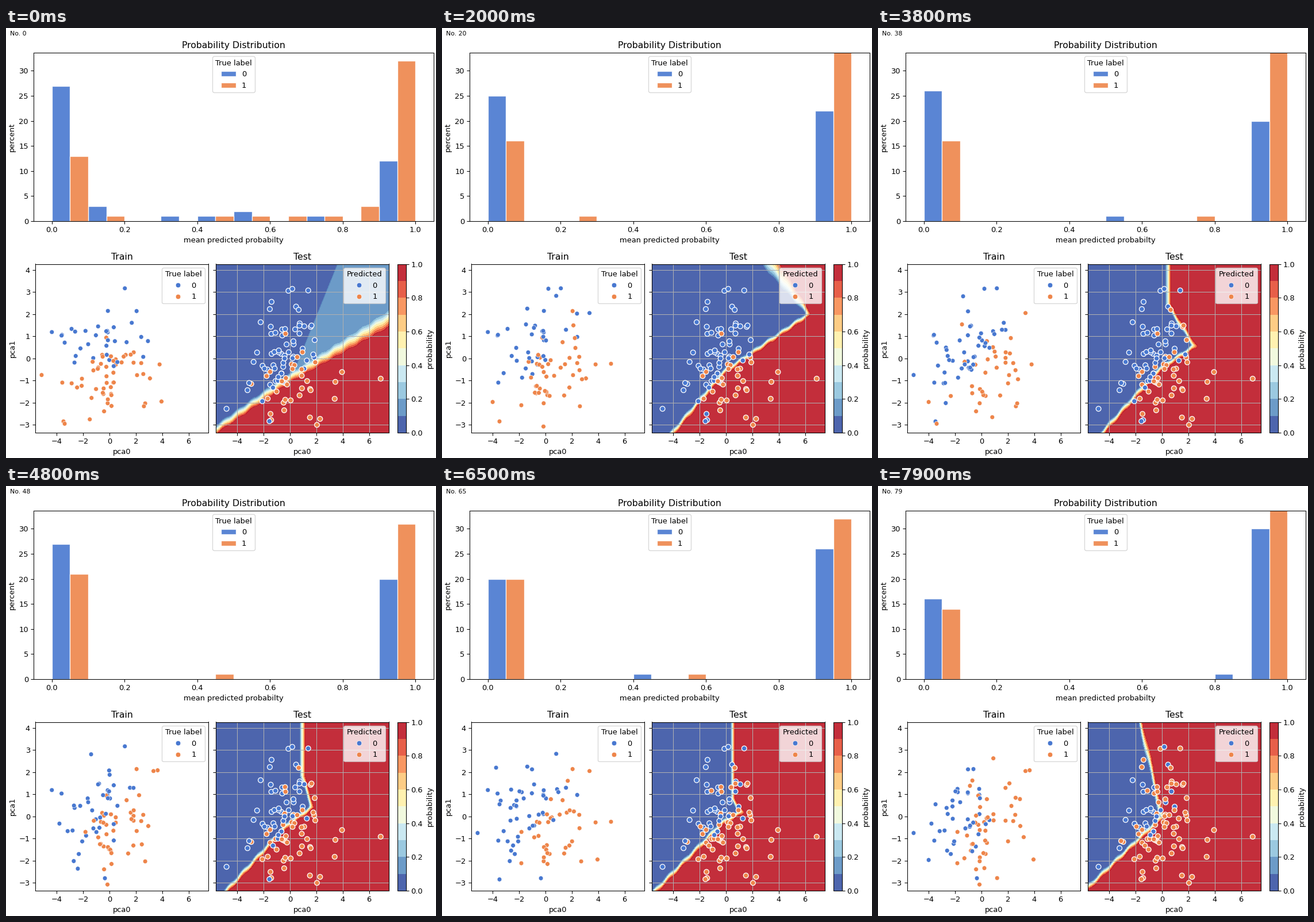
A matplotlib script that plays this animation: 748x748 px, repeating every 8000 ms.

```python
import matplotlib.pyplot as plt
import numpy as np
from matplotlib.animation import FuncAnimation
from matplotlib.lines import Line2D
from matplotlib.patches import Patch
from matplotlib.path import Path

SIZE, FRAMES, INTERVAL = 748, 80, 100
BLUE, ORANGE = "#4878d0", "#ee854a"
COLORS = np.array([BLUE, ORANGE])
XLIM, YLIM = (-5.61, 7.5), (-3.36, 4.26)
LEVELS = np.linspace(0, 1, 11)
ASPECT = np.array([.6, 1])  # makes data distances match screen distances


def cloud(rng, center, spread, count):
    """Normally distributed points without far outliers."""
    z = rng.normal(size=(count * 2, 2))
    return np.array(center) + z[(abs(z) < 2.6).all(1)][:count] * spread


rng = np.random.default_rng(7)
POOL = cloud(rng, (-.1, 0), (2, 1.4), 210)
POOL_NOISE = rng.normal(0, .5, len(POOL))
TEST = np.vstack([cloud(rng, (-.3, 0), (1.6, 1.25), 95),
                  [(6.88, -.92), (3.95, -.62), (-4.8, -2.28)]])
TEST_NOISE = rng.normal(.1, .65, len(TEST))
GRID_X, GRID_Y = np.meshgrid(np.linspace(*XLIM, 100), np.linspace(*YLIM, 80))
GRID = np.column_stack([GRID_X.ravel(), GRID_Y.ravel()])


def boundary(i):
    """Vertices (x, y, half width): a slope up to a knee, an apex, then the top."""
    slope = np.interp(i, [0, 9, 20, 79], [.42, .26, .71, .57])
    knee_y = np.interp(i, [0, 9, 20, 79], [-.95, -1.05, -.65, -.15])
    apex_x = np.interp(i, [9, 20, 38, 48, 65, 79], [8, 6.3, 2.5, 1.7, 1.2, 0])
    apex_y = np.interp(i, [0, 9, 20, 38, 79], [2, 1, 2, .55, 0])
    top_x = np.interp(i, [9, 20, 38, 48, 65, 79], [8, 3.3, .5, .95, .5, -1.65])
    bend_y = np.interp(i, [20, 38, 65, 79], [4.4, 2.4, .8, 4.4])
    soft = max(0, 1 - i / 9)
    top_width = .11 + .33 * np.exp(-((i - 20) / 8) ** 2)
    knee_x = -.2
    return np.array([
        (knee_x - 20, knee_y - 20 * slope, .12),
        (knee_x, knee_y, .12 + .1 * soft),
        (apex_x, apex_y, .12 + .32 * soft),
        (top_x, bend_y, top_width),
        (top_x, 20, top_width),
    ])


def signed_distance(points, line):
    """Distance to the line, positive on the red side, and its local width."""
    a, b = line[:-1, None, :2] * ASPECT, line[1:, None, :2] * ASPECT
    p = points[None] * ASPECT
    length2 = np.maximum(((b - a) ** 2).sum(-1), 1e-9)
    u = np.clip(((p - a) * (b - a)).sum(-1) / length2, 0, 1)
    dist = np.sqrt(((p - a - u[..., None] * (b - a)) ** 2).sum(-1))
    near, cols = dist.argmin(0), np.arange(len(points))
    u, dist = u[near, cols], dist[near, cols]
    width = (1 - u) * line[near, 2] + u * line[near + 1, 2]
    red_side = Path(np.vstack([line[:, :2], (20, 20), (20, -40)]))
    return np.where(red_side.contains_points(points), dist, -dist), width


def probability(i):
    dist, width = signed_distance(GRID, boundary(i))
    x, y = GRID.T
    prob = .5 + (dist + .03 * np.sin(6 * x + i)) / (2 * width)
    # early on the upper right is still slightly uncertain
    haze = .16 * max(0, 1 - i / 9) * np.clip(.62 + 2 * (x - .72 - .68 * y), 0, 1)
    return np.clip(np.maximum(prob, haze), .001, .999).reshape(GRID_X.shape)


def histogram(i, rng):
    low = (np.interp(i, [0, 9, 48, 65, 79], [27, 25, 27, 20, 16]),
           np.interp(i, [0, 9, 20, 38, 48, 65, 79], [13, 19, 16, 16, 21, 20, 14]))
    counts = np.zeros((2, 10), int)
    for row, first, total in zip(counts, low, (47, 53)):
        uncertain = round(7 * np.exp(-i / 4)) + rng.integers(2)
        np.add.at(row, rng.integers(1, 9, uncertain), 1)
        row[0] = int(first)
        row[9] = total - row.sum()
    return counts


def train_set(i, rng):
    pick = rng.choice(len(POOL), 86, replace=False)
    angle = np.radians(np.interp(i, [0, 20, 79], [12, 45, 68]))
    x, y = (POOL[pick] / (2, 1.4)).T
    score = y * np.cos(angle) - x * np.sin(angle) + POOL_NOISE[pick]
    return POOL[pick], (score < .15).astype(int)


def predictions(i):
    dist, _ = signed_distance(TEST, boundary(i))
    return (dist + TEST_NOISE > 0).astype(int)


fig = plt.figure(figsize=(8, 8), dpi=SIZE / 8, facecolor="white")


def add_axes(left, top, right, bottom):
    return fig.add_axes([left / SIZE, 1 - bottom / SIZE,
                         (right - left) / SIZE, (bottom - top) / SIZE])


def dot_legend(ax, title):
    dots = [Line2D([], [], ls="", marker="o", ms=6.6, mfc=c, mec="white", mew=.48)
            for c in COLORS]
    ax.legend(dots, ["0", "1"], title=title, loc="upper right")


counter = fig.text(.01, 1 - 13 / SIZE, "", fontsize="small")

hist = add_axes(48, 43, 744, 336)
hist.set(xlim=(-.05, 1.05), ylim=(0, 33.6), title="Probability Distribution",
         xlabel="mean predicted probabilty", ylabel="percent")
bar_style = dict(alpha=.9, edgecolor="white", linewidth=1)
bars = [hist.bar(np.arange(10) / 10 + c * .05, np.zeros(10), .05, align="edge",
                 color=COLORS[c], **bar_style) for c in (0, 1)]
hist.legend([Patch(facecolor=c, **bar_style) for c in COLORS], ["0", "1"],
            title="True label", loc="upper center")

train = add_axes(51, 410.5, 352, 704)
test = add_axes(365, 410.5, 666, 704)
for ax, title in ((train, "Train"), (test, "Test")):
    ax.set(xlim=XLIM, ylim=YLIM, title=title, xlabel="pca0",
           xticks=range(-4, 7, 2), yticks=range(-3, 5))
train.set_ylabel("pca1")
test.tick_params(labelleft=False)
test.grid(True)
dot_legend(train, "True label")
dot_legend(test, "Predicted")

train_dots = train.scatter([], [], s=36, edgecolors="white", linewidths=.48)
test_dots = test.scatter(*TEST.T, s=45, edgecolors="white", linewidths=1, zorder=2)


def draw_field(i):
    return test.contourf(GRID_X, GRID_Y, probability(i), levels=LEVELS, alpha=.9,
                         cmap="RdYlBu_r", vmin=0, vmax=1, zorder=0)


field = draw_field(0)
fig.colorbar(field, cax=add_axes(681, 410.5, 695.5, 704),
             ticks=LEVELS[::2], label="probability")


def update(i):
    global field
    rng = np.random.default_rng(100 + i)
    counter.set_text(f"No. {i}")
    for group, counts in zip(bars, histogram(i, rng)):
        for bar, n in zip(group, counts):
            bar.set_height(n)
            bar.set_visible(n > 0)
    points, labels = train_set(i, rng)
    train_dots.set_offsets(points)
    train_dots.set_facecolor(COLORS[labels])
    test_dots.set_facecolor(COLORS[predictions(i)])
    field.remove()
    field = draw_field(i)
    return []


anim = FuncAnimation(fig, update, frames=FRAMES, interval=INTERVAL,
                     init_func=lambda: [], repeat=True, repeat_delay=0)
plt.show()
```
